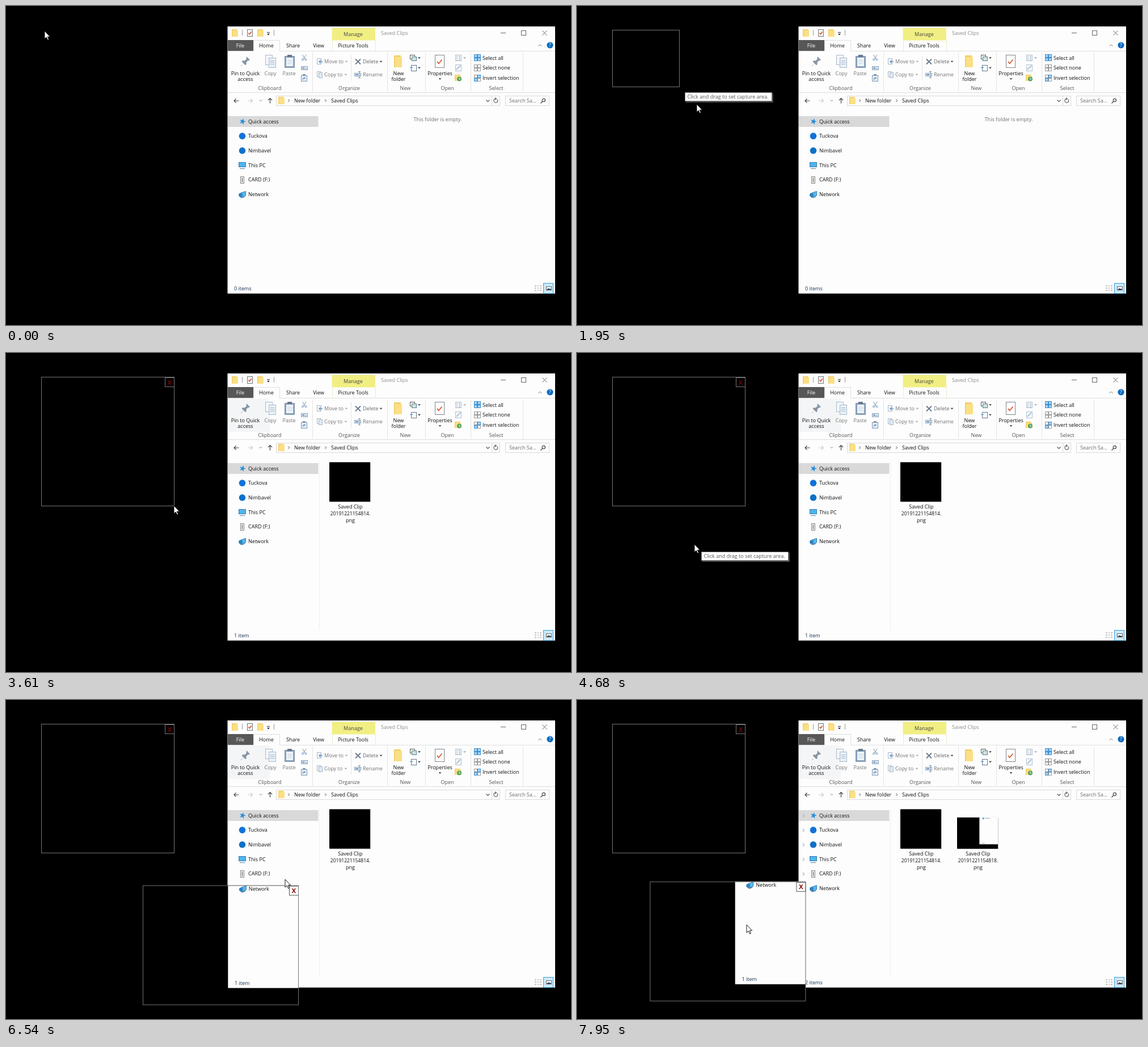
These frames come from a looping animation (996x562 px, 8000 ms). An HTML page:

```html
<!DOCTYPE html>
<html lang="en">
<head>
<meta charset="utf-8">
<title>Screen clip demo</title>
<style>
  html, body { margin: 0; width: 100%; height: 100%; overflow: hidden; background: #000; }
  svg { display: block; width: 100%; height: 100%; font-family: "Open Sans", "Noto Sans", sans-serif; }
</style>
</head>
<body>
<script>
const LOOP = 8000;
const ROWS = ['Quick access', 'Tuckova', 'Nimbavel', 'This PC', 'CARD (F:)', 'Network'];
const rowY = i => 203.5 + 25.65 * i;

// Markup helpers
const rect = (x, y, w, h, fill, more = '') =>
  `<rect x="${x}" y="${y}" width="${w}" height="${h}" fill="${fill}" ${more}/>`;
const box = (x, y, w, h, stroke, fill = 'none', more = '') =>
  rect(x + .5, y + .5, w - 1, h - 1, fill, `stroke="${stroke}" ${more}`);
const line = (d, stroke = '#555', width = 1, fill = 'none') =>
  `<path d="${d}" stroke="${stroke}" stroke-width="${width}" fill="${fill}"/>`;
const shape = (d, fill) => `<path d="${d}" fill="${fill}"/>`;
const disc = (x, y, r, fill) => `<circle cx="${x}" cy="${y}" r="${r}" fill="${fill}"/>`;
const text = (x, y, s, fill = '#111', anchor = 'start', size = 9.05) =>
  `<text x="${x}" y="${y + 3.3}" fill="${fill}" text-anchor="${anchor}" font-size="${size}">${s}</text>`;
const mid = (x, y, s, fill, size) => text(x, y, s, fill, 'middle', size);
const tri = (x, y, fill = '#444') => shape(`M${x - 2.5} ${y - 1.2}h5l-2.5 2.7z`, fill);
const folder = (x, y, w, h) =>
  rect(x, y, w * .85, h, '#f3cd62') + rect(x + w * .12, y + h * .12, w * .88, h * .88, '#fbdf85');
const page = (x, y, w, h, stroke = '#8ba3bb', fill = '#f4f8fc') => box(x, y, w, h, stroke, fill);
const check = (x, y, k) => line(`M${x} ${y}l${2 * k} ${2.5 * k} ${4 * k} ${-5 * k}`, '#d8532c', 1.7);
const chevron = (x, y, stroke) => line(`M${x - 1.5} ${y - 3}l3 3-3 3`, stroke, 1.2);

function titleBar() {
  return folder(398, 41, 11, 13) + rect(416, 42, 1, 10, '#999') +
    page(425, 41, 10, 13, '#777') + check(427.5, 47.5, .9) +
    folder(443, 41, 11, 13) + rect(460, 46, 5, 1, '#333') + tri(462.5, 50, '#222') + rect(472, 42, 1, 10, '#999') +
    rect(574.5, 38.5, 76.5, 22, '#f1ef83') + mid(612, 50, 'Manage', '#444') +
    text(661, 48, 'Saved Clips', '#8c8c8c') +
    rect(872, 47, 9, 1, '#666') + box(908, 43, 9, 9, '#666') +
    line('M945.5 43.5l8 8m0-8l-8 8', '#666');
}

function tabs() {
  return rect(391, 79, 577, 1, '#dedfe0') +
    rect(391, 60, 45, 19, '#575757') + mid(413, 70, 'File', '#fff') +
    rect(436, 60, 46, 20, '#fdfdfd') + line('M436.5 79V60.5H482.5V79', '#dedfe0') +
    line('M575.5 60V79M651.5 60V79', '#ecebc8') +
    mid(459, 70, 'Home') + mid(506, 70, 'Share') + mid(551, 70, 'View') + mid(612, 70, 'Picture Tools') +
    line('M938.5 71l3-3 3 3', '#777') + disc(959, 69, 5.6, '#0b6abf') +
    mid(959, 69, '?', '#fff');
}

function ribbon() {
  const grey = '#747474', soft = '#a9b9c9', blue = '#3b8fd0';
  const grid = (y, fill) => [0, 1, 2, 3].map(i =>
    box(825 + i % 2 * 6, y + (i >> 1) * 6, 6, 6, fill(i) ? blue : '#999', fill(i) ? '#a9d3f3' : '#fff')).join('');
  return rect(391, 80, 74, 59, '#f4f5f6', 'id="tint"') +
    [540, 672, 739, 819, 911].map(x => rect(x, 82, 1, 69, '#e3e4e5')).join('') +
    rect(608, 86, 1, 45, '#e3e4e5') + rect(391, 152, 577, 1, '#dcddde') +
    [[465, 'Clipboard'], [605, 'Organize'], [704, 'New'], [778, 'Open'], [864, 'Select']]
      .map(([x, s]) => mid(x, 145, s, '#555')).join('') +
    // clipboard
    shape('M424 89l6 6-2 1.3-1.5-.3-3 3.2.2 3.6-1.7 1.5-3.4-3.4-4 5-.6-.6 5-4-3.4-3.4 1.5-1.7 3.6.2 3.2-3-.3-1.5z', '#8594a3') +
    mid(422, 119, 'Pin to Quick') + mid(422, 129, 'access') +
    page(457, 86, 13, 18, soft) + page(463, 91, 13, 18, soft, '#eaf1f8') +
    line('M465.5 96.5h8m-8 3h8m-8 3h8', soft) + mid(466, 119, 'Copy', grey) +
    box(491, 88, 18, 21, '#7f95ad', '#8ba3bd') + rect(494, 91, 12, 15, '#eef4fa') + rect(496, 86, 8, 4, '#66788b') +
    line('M496 95.5h8m-8 3h8m-8 3h8', '#c3d3e2') + mid(499, 119, 'Paste', grey) +
    line('M522.5 86l5 8M529 86l-5 8', '#8292a3') + line('M523 96a1.5 1.5 0 1 1 .1 0zM528.5 96a1.5 1.5 0 1 1 .1 0z', '#5f8fc0') +
    box(520, 106, 12, 7, '#8ba3bb', '#dfeaf4') + line('M522 108l1 3 1-3 1 3 1-3M527 110.5h3', '#6f8caa', .8) +
    box(520, 122, 11, 11, '#7f95ad', '#e8f0f8') + rect(523, 120, 5, 3, '#7f95ad') + line('M523.5 130v-3h4m-2-2l2 2-2 2', '#4d80b5') +
    // organize
    page(548, 92, 8, 11, soft) + line('M558 98h-6m2.5-2.5l-2.5 2.5 2.5 2.5', '#6d96c0', 1.4) +
    text(561, 98, 'Move to', grey) + tri(600, 98, '#aaa') +
    page(548, 115, 7, 10, soft) + page(551, 117, 7, 10, soft, '#dfeaf5') +
    text(561, 121, 'Copy to', grey) + tri(599, 121, '#aaa') +
    line('M616 93.5l9 9m0-9l-9 9', '#6b7c8f', 2) + text(629, 98, 'Delete', '#666') + tri(661, 98) +
    box(614, 118, 12, 6, '#8ba3bb', '#eaf1f8') + rect(616, 120, 5, 2, '#5f8fc0') +
    line('M621 115.5h4m-4 11h4m-2-11v11', '#7f8f9f') + text(629, 121, 'Rename', grey) +
    // new
    folder(684, 87, 14, 21) + mid(692, 119, 'New') + mid(692, 129, 'folder') +
    box(712, 86, 9, 8, '#555', '#fff') + box(715, 89, 9, 8, '#5a7f9f', '#cfe3d4') + tri(728.5, 91.5) +
    page(714, 104, 10, 11, '#667788', '#fff') + line('M712 108.5h5m-2.5-2.5v5', '#3f86c6') + tri(728.5, 109) +
    // open
    page(756, 86, 17, 23, '#7d8791', '#fff') + check(760, 98, 1.4) +
    mid(765, 119, 'Properties') + tri(765, 128.5) +
    page(792, 86, 11, 11, '#b3c0cc') + line('M794 89h2m-2 3h2m-2 3h2m2-6h3m-3 3h3m-3 3h3', '#8fa6bb') + tri(808.5, 91.5, '#aaa') +
    page(792, 103, 11, 12, '#b3c0cc') + line('M794 112l7-7', '#9db4ca', 1.6) +
    folder(791, 121, 11, 11) + disc(799, 128.5, 4, '#58a55c') + line('M799 126.5v2.5h2', '#fff') +
    // select
    grid(85, () => 1) + grid(103, () => 0) + grid(121, i => i == 1 || i == 2) +
    text(840, 91.5, 'Select all') + text(840, 109, 'Select none') + text(840, 127, 'Invert selection');
}

function addressBar() {
  return line('M402 167h8.5M405.5 163.5l-3.5 3.5 3.5 3.5', '#444', 1.2) +
    line('M426 167h8.5M431 163.5l3.5 3.5-3.5 3.5', '#ccc', 1.2) +
    line('M447 165.5l2 2 2-2', '#777') + line('M465.5 171.5v-9M462 166l3.5-3.5 3.5 3.5', '#444', 1.2) +
    box(476, 158, 395, 18, '#d9d9d9') + rect(856, 158, 1, 18, '#d9d9d9') + folder(480, 160, 11, 13) +
    line('M497.5 164.5l2.2 2.2-2.2 2.2M562.5 164.5l2.2 2.2-2.2 2.2', '#444') +
    text(508, 167, 'New folder') + text(573, 167, 'Saved Clips') +
    line('M846.5 165.5l3 3 3-3', '#555', 1.2) +
    line('M866 164.5a3.5 3.5 0 1 1-3-1.2M862 161.5l2.5 1.8-2.3 2', '#555', 1.1) +
    box(880, 158, 78, 18, '#d9d9d9') + text(887, 167, 'Search Sa...', '#6d6d6d') +
    line('M950.5 166a2.7 2.7 0 1 1-5.4 0 2.7 2.7 0 1 1 5.4 0M945.8 168l-3.3 3.5', '#444', 1.2);
}

function navPane() {
  const star = Array.from({ length: 10 }, (_, i) => {
    const a = i * Math.PI / 5 - 1.3, r = i % 2 ? 2.4 : 5.8;
    return `${417 + r * Math.cos(a)} ${203.5 + r * Math.sin(a)}`;
  }).join('L');
  return rect(391, 194, 159.5, 19, '#d9d9d9', 'id="quick"') +
    rect(391, 0, 159.5, 19, '#e5f3ff', 'id="hover"') +
    shape(`M${star}z`, '#2a8fdb') + disc(416.5, rowY(1), 5.8, '#1272d8') + disc(416.5, rowY(2), 5.8, '#0f71c8') +
    box(410, 275, 13, 9, '#3c7fae', '#4db4ee') + rect(412, 286, 9, 1, '#5c7d94') +
    box(413, 300, 7, 13, '#8f8f8c', '#e2e2de') + rect(416, 303, 1, 7, '#666') +
    line('M413.5 329.5l9-3v7.5l-9 3.5z', '#2f7fb5', 1, '#5cb8ec') + disc(413.5, 333, 3.4, '#2b83bf') +
    line('M415 338l6-2', '#4d6f86', 1.2) +
    ROWS.map((s, i) => text(427, rowY(i), s)).join('');
}

function viewButtons() {
  return line('M932 493h3m-3 4h3m-3 4h3m2-8h2m-2 4h2m-2 4h2m2-8h3m-3 4h3m-3 4h3', '#888') +
    box(947, 488, 18, 19, '#3ba0dc', '#cce8f8') + box(952, 494, 10, 7, '#666', '#fff') + shape('M953 500l3-3 2 1.5 1.5-1 1.5 2.5z', '#345');
}

const label = (x, digits) =>
  mid(x, 271, 'Saved Clip') + mid(x, 283, digits, '#111', 8.5) + mid(x, 295, 'png');
const closeBox = (right, top, border, ink) =>
  box(right - 17, top, 17, 17, border) +
  `<text x="${right - 8.5}" y="${top + 12.5}" fill="${ink}" font-size="11" font-weight="700" text-anchor="middle">X</text>`;
const STATUS = '#16304f', EDGE = '#757575';

document.body.innerHTML = `<svg viewBox="0 0 996 562">
<defs>
  <clipPath id="crop"><rect x="241" y="326.5" width="275" height="211"/></clipPath>
  <g id="shot" clip-path="url(#crop)">${rect(241, 326, 275, 212, '#000')}
    <use href="#base" transform="translate(.84 .84)"/>${text(403, 498.4, '1 item', STATUS)}</g>
</defs>
${rect(0, 0, 996, 562, '#000')}
<g id="base">${rect(390.5, 36, 577.5, 470.6, '#fdfdfd')}${titleBar()}${tabs()}${ribbon()}${addressBar()}${navPane()}${viewButtons()}</g>
<g id="status">${text(402, 497.5, '0 items', STATUS)}</g>
<g id="chevrons">${[0, 1, 2, 3, 4].map(i => chevron(399.3, rowY(i) + .5, 'currentColor')).join('')}</g>
<g id="empty">${mid(761, 199.5, 'This folder is empty.', '#6d6d6d')}</g>
<g id="clip1">${rect(552, 192, 1, 296, '#efefef')}${rect(571, 193, 72, 70, '#ccc')}${rect(570, 192.4, 72, 69.4, '#000')}${label(607, '20191221154814.')}</g>
<g id="clip2">${rect(671, 208, 72, 55, '#ccc')}
  <use href="#shot" transform="translate(670 207) scale(.2618) translate(-241 -327)"/>${label(707, '20191221154818.')}</g>
<g id="pinned"><use href="#shot"/>${closeBox(516, 327.5, '#555', '#8b0000')}</g>
<rect id="area1" fill="none" stroke="${EDGE}"/><rect id="area2" fill="none" stroke="${EDGE}"/>
<g id="close1">${closeBox(297, 43, EDGE, '#780000')}</g>
<g id="tip">${rect(2, 2, 154, 16, '#777', 'opacity=".6"')}${box(0, 0, 154, 16, '#767676', '#fff')}${text(4.5, 8, 'Click and drag to set capture area.', '#575757')}</g>
<path id="cursor" fill="#fff" stroke="#000" stroke-width=".9"/>
</svg>`;

const $ = id => document.getElementById(id);
const show = (id, on) => $(id).setAttribute('display', on ? 'inline' : 'none');
const move = (id, x, y, more = '') => $(id).setAttribute('transform', `translate(${x} ${y}) ${more}`);
const at = (list, t) => list.findLast(row => row[0] <= t);

const DOUBLE = 'M-8 0L-4-3.5V-1.2H4V-3.5L8 0 4 3.5V1.2H-4V3.5Z';
const POINTERS = {
  arrow: ['M0 0V14L3.2 11 5.6 16 7.6 15.1 5.3 10.2H9.7Z', ''],
  hand: ['M0 1.2Q1.2-.4 2.4 1.2V5.5L4.8 6 7 6.8 8.4 8V12L7 17.5H.5L-2 13-4.6 9.6Q-4.8 8-3 8.4L0 10.5Z', ''],
  wide: [DOUBLE, ''],
  corner: [DOUBLE, 'rotate(45) scale(.85)']
};

// Time, x, y and, where it is not the arrow, the pointer kind
const POINTER = [
  [0, 68, 44], [1400, 63, 44], [1710, 82, 60], [1830, 140, 108], [1950, 211, 173], [2070, 270, 229],
  [2220, 296, 269], [3730, 285, 311], [3880, 222, 335], [4010, 197, 337], [4440, 201, 337],
  [4560, 206, 338], [4680, 207, 337], [4820, 225, 333], [4940, 244, 329], [5340, 262, 333],
  [5490, 385, 408, 'wide'], [5640, 465, 495], [5760, 507, 530], [5880, 513, 534],
  [6260, 515, 538, 'corner'], [6410, 503, 420], [6540, 492, 316], [6690, 457, 291, 'hand'],
  [6840, 452, 202, 'hand'], [7430, 455.3, 310, 'hand'], [7550, 432, 352], [7670, 412, 399],
  [7830, 356, 399], [7950, 299, 396]
];
// Lower right corner of each dragged area
const DRAG1 = [[1710, 72, 52], [1830, 112, 85], [1950, 181, 143], [2070, 254, 220], [2220, 297, 275], [2350, 297, 270]];
const DRAG2 = [[5340, 262, 333], [5490, 356, 390], [5640, 440, 470], [5760, 500, 525], [5880, 516, 537.5]];
const HOVER = [[0, -1], [6690, 3], [6840, 0], [7430, 4], [7550, -1]];
const SHIFT = [[0, 0, 0], [7830, -56, -3], [7950, -112.6, -6.7]];

function area(id, x, y, corner) {
  show(id, corner);
  if (!corner) return;
  const size = { x: x + .5, y: y + .5, width: corner[1] - x - 1, height: corner[2] - y - 1 };
  for (const key in size) $(id).setAttribute(key, size[key]);
}

function draw(t) {
  const [, px, py, kind = 'arrow'] = at(POINTER, t);
  const [path, turn] = POINTERS[kind];
  $('cursor').setAttribute('d', path);
  move('cursor', px, py, turn);

  const drag1 = at(DRAG1, t), drag2 = at(DRAG2, t);
  const [, dx, dy] = at(SHIFT, t);
  area('area1', 62, 42, drag1);
  area('area2', 241, 326.5, drag2);
  move('area2', dx, dy);
  move('pinned', dx, dy);
  show('pinned', t >= 6020);
  show('close1', t >= 2470);
  show('tint', t >= 2470);

  show('tip', t >= 1090 && t < 2470 || t >= 4560 && t < 6020);
  const corner = t < 4000 ? drag1 : drag2;
  if (corner) move('tip', corner[1] + 9, corner[2] + 9);
  else if (t >= 1560 && t < 1710) move('tip', 76, 55);
  else move('tip', px + 12, py + 13);

  const [, row] = at(HOVER, t);
  show('hover', row > 0);
  $('hover').setAttribute('y', rowY(row) - 9);
  $('quick').setAttribute('fill', row === 0 ? '#cce8ff' : '#d9d9d9');
  show('chevrons', t >= 5760 && t < 6020 || t >= 6690);
  $('chevrons').setAttribute('color', t >= 7830 ? '#b5b5b5' : '#707070');

  show('empty', t < 3610);
  show('clip1', t >= 3610);
  show('clip2', t >= 7120);
  $('status').firstChild.textContent = t < 3610 ? '0 items' : t < 7120 ? '1 item' : '2 items';
}

function tick() {
  draw(performance.now() % LOOP);
  requestAnimationFrame(tick);
}
tick();
</script>
</body>
</html>
```
